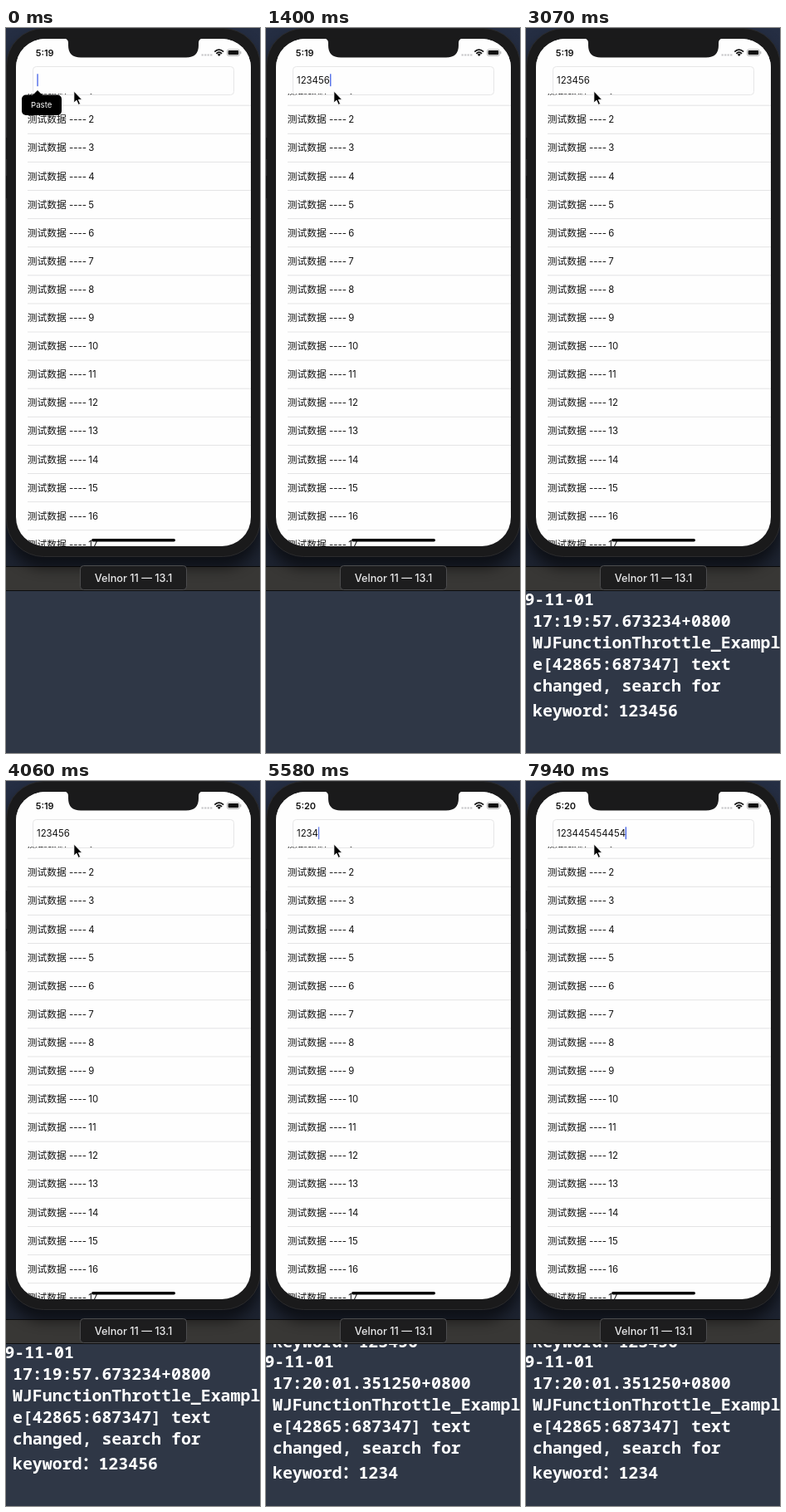
These frames come from a looping animation (306 by 873 pixels, 8000 ms). An HTML page:

```html
<!DOCTYPE html>
<html lang="en">
<head>
<meta charset="utf-8">
<title>Search field throttle</title>
<style>
  html, body { margin: 0; width: 100%; height: 100%; overflow: hidden; background: #2f3746; }
  svg { display: block; width: 100vw; height: 100vh; }
  text { font-family: Inter, "Noto Sans CJK SC", "Noto Sans CJK", sans-serif; white-space: pre; }
  #rows text { font-size: 11.4px; fill: #111; }
  #rows .label { font-size: 11.75px; font-family: "Noto Sans CJK SC", "Noto Sans CJK", sans-serif; }
  #rows path { stroke: #dededf; stroke-width: .8; }
  #console text {
    font: 600 19.9px "Noto Sans Mono", "Noto Sans CJK SC", "Noto Sans CJK", monospace;
    fill: #fff;
  }
</style>
</head>
<body>
<svg viewBox="0 0 306 873">
  <defs>
    <linearGradient id="desk" x2="0" y2="1">
      <stop stop-color="#252e43"/><stop offset="1" stop-color="#1d2330"/>
    </linearGradient>
    <filter id="soft" x="-20%" width="140%"><feGaussianBlur stdDeviation="8"/></filter>
    <clipPath id="screen"><rect x="12" y="13" width="283" height="611" rx="35"/></clipPath>
    <clipPath id="desktop"><rect width="306" height="677"/></clipPath>
    <clipPath id="log"><rect y="678" width="306" height="195"/></clipPath>
  </defs>

  <rect width="306" height="873" fill="#2f3746"/>
  <rect width="306" height="648" fill="url(#desk)"/>
  <rect y="648" width="306" height="30" fill="#383735"/>
  <path d="M0 648.5H306M0 677.5H306" stroke="#0b0b0c"/>
  <g clip-path="url(#desktop)">
    <rect y="10" width="306" height="640" rx="46" opacity=".55" filter="url(#soft)"/>
  </g>
  <g id="console" clip-path="url(#log)"></g>

  <!-- device -->
  <rect x=".5" y=".5" width="306" height="636" rx="45" fill="#1a1a1b" stroke="#2b2b2d"/>
  <path d="M.8 132V158M.8 178V205" stroke="#131314"/>
  <g clip-path="url(#screen)">
    <rect x="12" y="13" width="283" height="611" fill="#fefefe"/>
    <g id="rows"></g>
    <rect x="12" y="13" width="283" height="66" fill="#fefefe"/>
    <rect x="103" y="615" width="101" height="3.6" rx="1.8"/>
  </g>
  <path d="M70 12.5Q75 13 75 18V21Q75 35.5 90 35.5H217Q232 35.5 232 21V18Q232 13 237 12.5Z" fill="#1a1a1b"/>

  <!-- status bar -->
  <text id="clock" x="35.7" y="34" font-size="11" font-weight="600" fill="#111"></text>
  <path d="M235.5 32.4H249" stroke="#c8c8ca" stroke-width="2" stroke-dasharray="2.4 1.1"/>
  <g fill="none" stroke="#111" stroke-width="1.7">
    <path d="M251.3 28.6Q256.7 23.6 262.1 28.6M253.3 30.8Q256.7 27.7 260.1 30.8"/>
    <path d="M254.6 31.8Q256.7 30 258.8 31.8L256.7 34Z" fill="#111" stroke="none"/>
    <rect x="266.4" y="25.9" width="15" height="7.6" rx="2" stroke="#aaa" stroke-width=".8"/>
    <rect x="267.6" y="27.1" width="12.6" height="5.2" rx="1" fill="#111" stroke="none"/>
    <path d="M282.8 28.2V31.2" stroke="#aaa" stroke-width="1"/>
  </g>

  <!-- search field -->
  <rect x="32.5" y="46.5" width="242" height="34" rx="4" fill="none" stroke="#e6e6e7"/>
  <text id="typed" x="37" y="67" font-size="11.4" fill="#111"></text>
  <rect id="caret" y="55.3" width="1.3" height="14.9" fill="#4361e6"/>
  <g id="popup">
    <path d="M32 81L38 75L44 81Z"/>
    <rect x="19" y="80.5" width="48" height="24.5" rx="5"/>
    <text x="42.7" y="96.3" font-size="9.6" fill="#fff" text-anchor="middle">Paste</text>
  </g>
  <path d="M81.8 76V90.2L85 87.2L87.2 92.4L89.6 91.4L87.4 86.4H91.8Z" stroke="#fff" stroke-width="1"/>

  <!-- device label -->
  <rect x="89.5" y="647.5" width="128" height="29" rx="4" fill="#1d1d1e" stroke="#4c4c4e"/>
  <text x="153.5" y="667" font-size="12.7" font-weight="500" fill="#e9e9ea" text-anchor="middle">Velnor 11 — 13.1</text>
</svg>
<script>
const LOOP = 8000;
const $ = id => document.getElementById(id);
const clamp = v => Math.max(0, Math.min(1, v));
const latest = (events, t) => events.filter(([at]) => at <= t).pop()[1];

const LONG = '123445454454';
const typing = [
  [0, ''], [90, '1'], [290, '12'], [620, '123'], [860, '1234'], [1160, '12345'],
  [1400, '123456'], [4770, '12345'], [4980, '1234'], [7230, '12344'],
];
for (let i = 0; i < 7; i++) typing.push([7410 + i * 530 / 6, LONG.slice(0, 6 + i)]);

// Moments when the caret is fully hidden, then fully back
const blinks = [[2080, 2490], [3070, 3480], [4040, 4440], [5700, 6120], [6710, 7090]];

function caretOpacity(t) {
  return Math.min(...blinks.map(([off, on]) => clamp(Math.max((off - t) / 150, 1 - (on - t) / 90))));
}

function caretX(count) {
  return count === 0 ? 37.4 : count === 1 ? 42 : 34.5 + 7.1 * count;
}

const line = (x, y, text) => `<text x="${x}" y="${y}">${text}</text>`;

function logEntry(top, time, keyword) {
  const body = [time + '+0800', 'WJFunctionThrottle_Exampl', 'e[42865:687347] text', 'changed, search for'];
  return line(-37.4, top, '2019-11-01')
    + body.map((text, i) => line(8, top + 26 * (i + 1), text)).join('')
    + line(8, top + 134, 'keyword：' + keyword);
}

const logs = [
  [0, ''],
  [1910, logEntry(695, '17:19:57.673234', '123456')],
  [5490, line(8, 682, 'keyword：123456') + logEntry(706, '17:20:01.351250', '1234')],
];

$('rows').innerHTML = Array.from({ length: 17 }, (_, i) => {
  const y = 80.2 + 34.1 * i;
  return `<text class="label" x="25.7" y="${y}">测试数据</text>`
    + line(76, y, '----') + line(99.3, y, i + 1)
    + `<path d="M26 ${y + 13}H295"/>`;
}).join('');

let shownLog;
function draw(t) {
  const text = latest(typing, t);
  $('typed').textContent = text;
  $('caret').setAttribute('x', caretX(text.length));
  $('caret').setAttribute('opacity', caretOpacity(t));
  $('popup').setAttribute('opacity', clamp(1 - (t - 60) / 240));
  $('clock').textContent = t < 4180 ? '5:19' : '5:20';
  const log = latest(logs, t);
  if (log !== shownLog) $('console').innerHTML = shownLog = log;
}

const start = performance.now();
function tick() {
  draw((performance.now() - start) % LOOP);
  requestAnimationFrame(tick);
}
tick();
</script>
</body>
</html>
```
